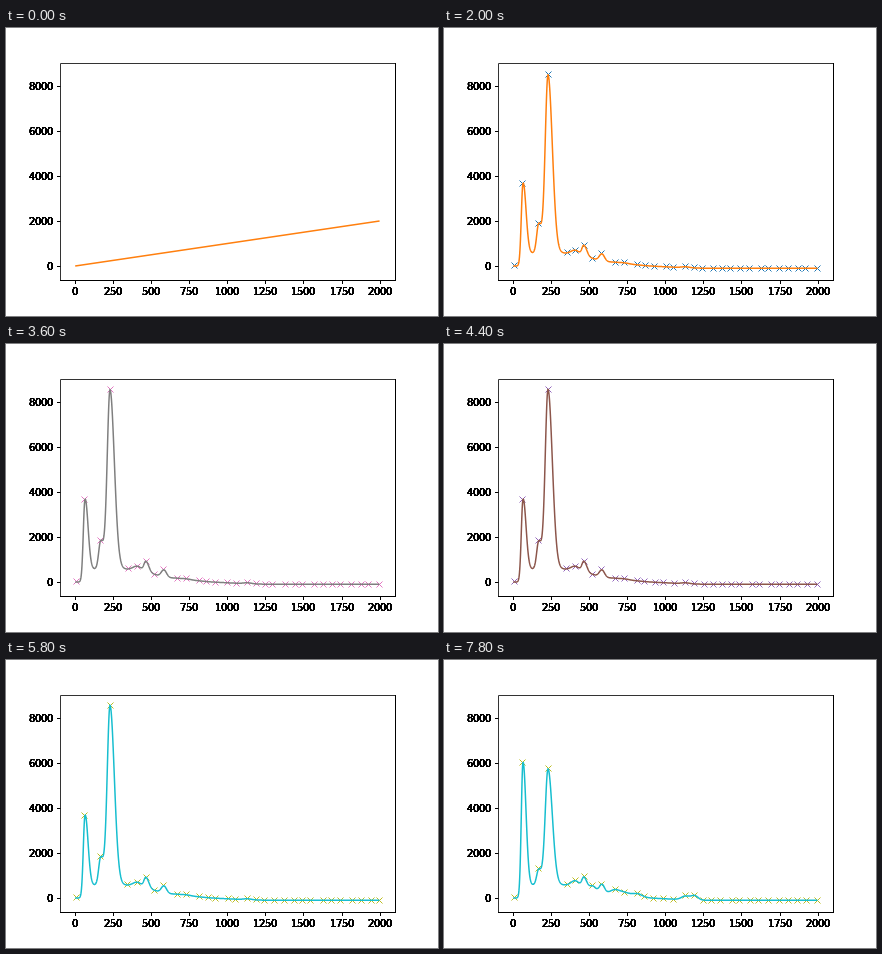
Animation, 432 px wide and 288 px high, one loop 8000 ms. Source, as an HTML page with a canvas:

```html
<!DOCTYPE html>
<html lang="en">
<head>
<meta charset="utf-8">
<title>Spectrum plot</title>
<style>
html, body { margin: 0; width: 100%; height: 100%; overflow: hidden; background: #fff; }
canvas { display: block; }
</style>
</head>
<body>
<canvas id="plot" width="432" height="288"></canvas>
<script>
const ctx = document.getElementById('plot').getContext('2d');
const STEP = 200, STEPS = 40, MORPH_FROM = 33, SETTLE = 20;
const LEFT = 54.5, RIGHT = 389.5, TOP = 35.5, BOTTOM = 252.5;
const X0 = 69.2, X_END = 373.5, X_UNIT = 0.15218, Y0 = 238, Y_UNIT = 0.0225;

// marker colour, line colour
const COLORS = [
  ['#1f77b4', '#ff7f0e'],
  ['#2ca02c', '#d62728'],
  ['#9467bd', '#8c564b'],
  ['#e377c2', '#7f7f7f'],
  ['#bcbd22', '#17becf']
];

// All in pixels; drift is the height gained while the curve settles
const peak = (x, left, right, height, end, drift = 0) => ({ x, left, right, height, end, drift });
const PEAKS = [
  peak(78.9, 1.65, 3, 77, 130),
  peak(94.7, 2, 3, 30, 15, -3),
  peak(104, 2.8, 4.3, 175.5, 115, 3),
  peak(131.5, 4.5, 4.5, 5, 6.5),
  peak(140, 2, 3, 11, 11),
  peak(148.8, 3, 3, 0.5, 5),
  peak(157.9, 2.6, 2.6, 7, 8.5),
  peak(171, 5, 5, 0.7, 5),
  peak(180.8, 5, 5, 1.2, 3.2),
  peak(193, 5, 5, 0.3, 3.5),
  peak(241.5, 4, 4, 0.9, 3.6),
  peak(250.5, 3.5, 3.5, 0, 4.3)
];
const FIRST_MARK = 70.8, TROUGH = 122;

const clamp01 = v => Math.min(1, Math.max(0, v));
const smooth = t => t * t * (3 - 2 * t);
const bell = (d, sigma) => Math.exp(-d * d / (2 * sigma * sigma));

function random(seed) {
  const v = Math.sin(seed * 12.9898) * 43758.5453;
  return v - Math.floor(v);
}

// A wide hump that sets in at the first peak and sinks slightly below zero
function baseline(x) {
  const onset = 1 / (1 + Math.exp(79 - x));
  return 14 * onset * bell(x - 104, 38) - 2.3 * smooth(clamp01((x - 185) / 85));
}

function makeCurve(k) {
  const mix = clamp01((k - MORPH_FROM) / (STEPS - 1 - MORPH_FROM)) ** 1.7;
  const settled = clamp01(k / SETTLE);
  const heights = PEAKS.map(p => {
    const early = p.height + p.drift * settled;
    return early + (p.end - early) * mix;
  });
  return x => PEAKS.reduce((y, p, i) => {
    const d = x - p.x;
    return y - heights[i] * bell(d, d < 0 ? p.left : p.right);
  }, Y0 - baseline(x));
}

// One mark per peak, the rest spread loosely along the tail
function markerXs(k) {
  const centers = PEAKS.map(p => p.x);
  const xs = [FIRST_MARK, TROUGH + 4 * random(k) - 2, ...centers];
  for (let x = 202; x < X_END; x += 9.5) {
    if (centers.some(c => Math.abs(c - x) < 6)) continue;
    xs.push(Math.min(X_END, x + 4 * random(k * 31 + x) - 2));
  }
  return xs;
}

function segment(x1, y1, x2, y2) {
  ctx.moveTo(x1, y1);
  ctx.lineTo(x2, y2);
}

function stroke(color, width, trace) {
  ctx.strokeStyle = color;
  ctx.lineWidth = width;
  ctx.beginPath();
  trace();
  ctx.stroke();
}

// Repeated drawing hardens the glyph edges
function label(text, x, y) {
  for (let i = 0; i < 12; i++) ctx.fillText(text, x, y);
}

function drawLabels() {
  ctx.fillStyle = '#000';
  ctx.font = '10px "DejaVu Sans", sans-serif';
  ctx.letterSpacing = '0px';
  // Whole-pixel digit pitch
  const digit = ctx.measureText('0').width, pitch = Math.round(digit);
  ctx.letterSpacing = `${pitch - digit}px`;
  const width = v => String(v).length * pitch;
  for (let v = 0; v <= 2000; v += 250) {
    label(v, Math.round(X0 + v * X_UNIT - width(v) / 2), 267);
  }
  for (let v = 0; v <= 8000; v += 2000) {
    label(v, 47 - width(v), Y0 - v * Y_UNIT + 4);
  }
}

function drawAxes() {
  stroke('#333', 1, () => {
    segment(LEFT, TOP, LEFT, BOTTOM);
    segment(LEFT, TOP, RIGHT, TOP);
  });
  stroke('#000', 1, () => {
    segment(RIGHT, TOP - 0.5, RIGHT, BOTTOM + 0.5);
    segment(LEFT - 0.5, BOTTOM, RIGHT, BOTTOM);
    for (let v = 0; v <= 2000; v += 250) {
      const x = Math.round(X0 + v * X_UNIT) + 0.5;
      segment(x, BOTTOM, x, BOTTOM + 3.5);
    }
    for (let v = 0; v <= 8000; v += 2000) {
      const y = Y0 - v * Y_UNIT + 0.5;
      segment(LEFT - 3.5, y, LEFT, y);
    }
  });
}

function drawData(k) {
  const [markColor, lineColor] = COLORS[k % COLORS.length];
  if (k === 0) {
    stroke(lineColor, 1.5, () => segment(X0, Y0, X0 + 2000 * X_UNIT, Y0 - 2000 * Y_UNIT));
    return;
  }
  const curve = makeCurve(k);
  stroke(markColor, 1, () => {
    for (const x of markerXs(k)) {
      const cx = Math.floor(x) + 0.5, cy = Math.floor(curve(x)) + 0.5;
      segment(cx - 3, cy - 3, cx + 3, cy + 3);
      segment(cx - 3, cy + 3, cx + 3, cy - 3);
    }
  });
  stroke(lineColor, 1.5, () => {
    for (let x = X0; x <= X_END; x += 0.25) ctx.lineTo(x, curve(x));
  });
}

function draw(k) {
  ctx.fillStyle = '#fff';
  ctx.fillRect(0, 0, 432, 288);
  ctx.lineJoin = 'round';
  drawData(k);
  drawAxes();
  drawLabels();
}

const start = performance.now();
function tick() {
  draw(Math.floor((performance.now() - start) / STEP) % STEPS);
  requestAnimationFrame(tick);
}
tick();
</script>
</body>
</html>
```
